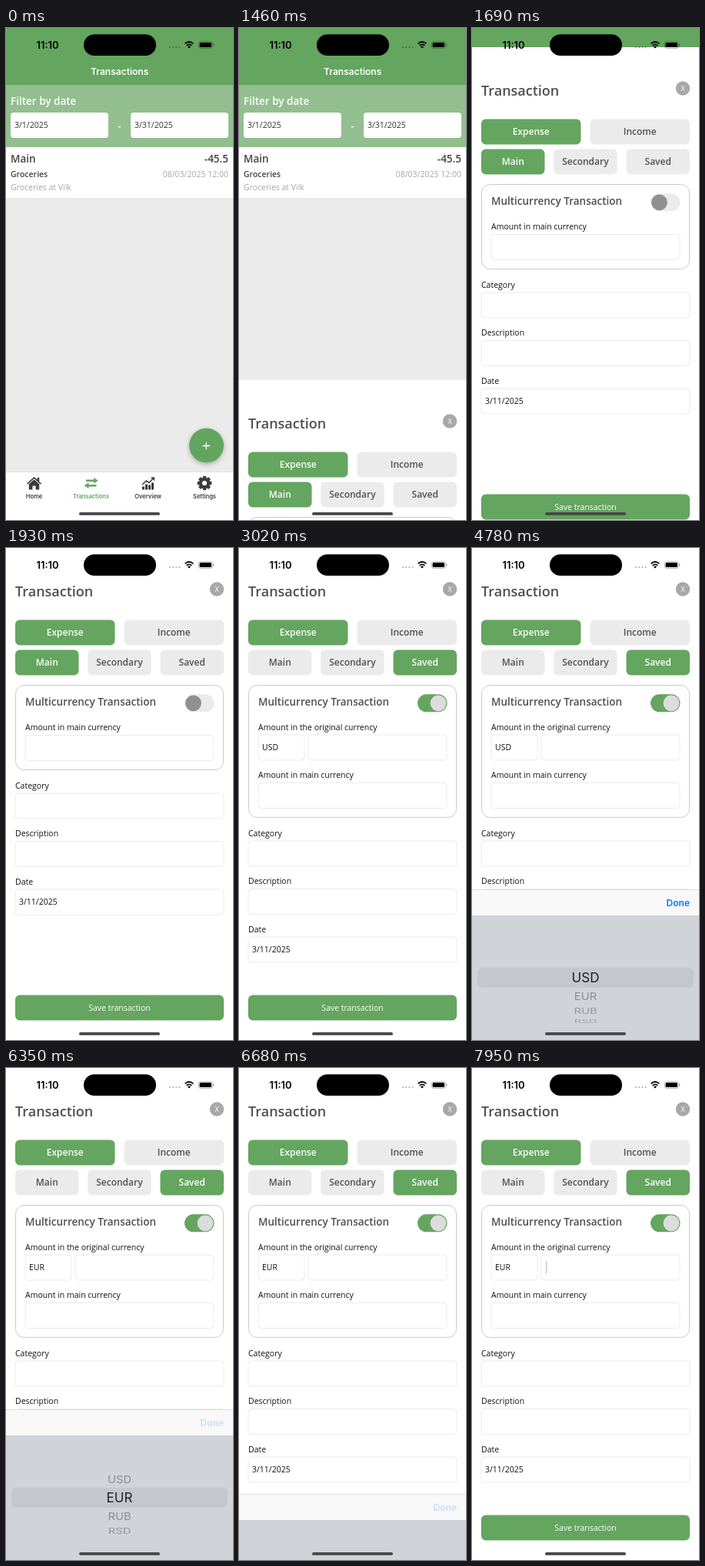
An HTML page that plays this animation: 295 px wide and 640 px high, repeating every 8000 ms.

```html
<!DOCTYPE html>
<html lang="en">
<head>
<meta charset="utf-8">
<title>Transactions</title>
<style>
  html, body { margin: 0; width: 100%; height: 100%; overflow: hidden; background: #fff; }
  svg { display: block; width: 100vw; height: 100vh; }
  text { font-family: "Open Sans", "Noto Sans", sans-serif; white-space: pre; }
  .ui { font-family: Inter, "Liberation Sans", sans-serif; }
</style>
</head>
<body>
<svg id="stage" viewBox="0 0 295 640" xmlns="http://www.w3.org/2000/svg"></svg>
<script>
const LOOP = 8000;
const GREEN = '#64a55f', GREY = '#ebebeb', INK = '#505050';

// Steps: [time in ms, value], each held until the next one.
const sheetSteps = [[0, 640], [1460, 458], [1580, 115], [1690, 25], [1810, 4], [1930, 0]];
const knobSteps = [[0, 0], [2660, 0.1], [2780, 0.5], [2900, 0.9], [3020, 1]];
const pickerSteps = [[0, 200], [4330, 140], [4440, 42], [4550, 10], [4670, 2], [4780, 0],
  [6570, 12], [6680, 110], [6800, 185], [6910, 200]];
const wheelSteps = [[0, 0], [5280, 0.08], [5390, 0.22], [5650, 0.62], [5760, 0.93], [5870, 1]];
const caretSteps = [[0, 0], [7280, 1], [7950, 0.4]];
const plusSteps = [[0, 1], [980, 0.7]];

const at = (steps, t) => steps.reduce((v, s) => t >= s[0] ? s[1] : v, steps[0][1]);

// Markup helpers
const rect = (x, y, w, h, fill, r = 0, more = '') =>
  `<rect x="${x}" y="${y}" width="${w}" height="${h}" rx="${r}" fill="${fill}" ${more}/>`;
const circle = (x, y, r, fill, more = '') =>
  `<circle cx="${x}" cy="${y}" r="${r}" fill="${fill}" ${more}/>`;
const path = (d, fill, more = '') => `<path d="${d}" fill="${fill}" ${more}/>`;
const line = (d, color, w, more = '') =>
  path(d, 'none', `stroke="${color}" stroke-width="${w}" ${more}`);
// y is the middle of the capitals
const text = (x, y, size, str, fill = '#111', weight = 400, anchor = 'start', more = '') =>
  `<text x="${x}" y="${y + size * 0.36}" font-size="${size}" fill="${fill}" font-weight="${weight}" text-anchor="${anchor}" ${more}>${str}</text>`;
const ui = (x, y, size, str, fill, weight, anchor, more = '') =>
  text(x, y, size, str, fill, weight, anchor, `class="ui" ${more}`);
const group = (id, body, more = '') => `<g id="${id}" ${more}>${body}</g>`;

const button = (x, y, w, label, on, id) =>
  rect(x, y, w, 33, on ? GREEN : GREY, 6, id ? `id="${id}"` : '') +
  text(x + w / 2, y + 16.5, 12, label, on ? '#fff' : INK, 600, 'middle', id ? `id="${id}Text"` : '');
const input = (x, y, w) =>
  rect(x, y, w, 33, '#fff', 4, 'stroke="#e6e6e6" stroke-width=".8"');
const field = (y, label, x = 12, w = 271) =>
  text(x, y, 10.5, label) + input(x, y + 10, w);

function gear(cx, cy) {
  let teeth = '';
  for (let a = 0; a < 360; a += 45)
    teeth += rect(cx - 2.2, cy - 9.3, 4.4, 5, '#3c3c3c', 0.8, `transform="rotate(${a} ${cx} ${cy})"`);
  return teeth + circle(cx, cy, 5.2, 'none', 'stroke="#3c3c3c" stroke-width="4.2"');
}

function tabBar() {
  const labels = [[36.5, 'Home'], [110.5, 'Transactions'], [184.5, 'Overview'], [258, 'Settings']];
  const dark = '#3c3c3c';
  const bars = [[177, 4], [181, 7], [185, 6], [189, 9]]
    .map(([x, h]) => rect(x, 600.5 - h, 3, h, dark)).join('');
  return rect(0, 577, 295, 63, '#fff') + rect(0, 577, 295, 0.7, '#d6d6d6') +
    path('M27 592.6L36.5 583.8L40.6 587.6V584.8H43.2V590L46 592.6L45 593.7L36.5 586L28 593.7Z', dark) +
    path('M29.8 593.3L36.5 587.3L43.2 593.3V600.5H38.6V595.5H34.4V600.5H29.8Z', dark) +
    path('M104 587.4H114.2V585L119.8 588.7L114.2 592.4V590H104Z', GREEN) +
    path('M117.4 593.9H107.4V591.5L101.6 595.2L107.4 598.9V596.5H117.4Z', GREEN) +
    bars + line('M177 594L182.2 589L186 591.5L191 586', dark, 1.5) +
    path('M188 584.2H193V589.2Z', dark) + gear(258, 592) +
    labels.map(([x, s], i) => ui(x, 608.8, 7.5, s, i === 1 ? GREEN : dark, 600, 'middle')).join('');
}

function listPage() {
  return rect(0, 0, 295, 640, GREY) + rect(0, 0, 295, 74, GREEN) +
    ui(147.7, 57, 12, 'Transactions', '#fff', 600, 'middle') +
    rect(0, 74, 295, 81, '#93be8f') +
    text(6, 95, 13.5, 'Filter by date', '#fff', 600) +
    rect(6, 110, 127, 33, '#fff', 4) + rect(162, 110, 127, 33, '#fff', 4) +
    text(11, 126.5, 10.5, '3/1/2025', '#333') + text(167, 126.5, 10.5, '3/31/2025', '#333') +
    text(147.5, 127, 13.5, '-', '#fff', 600, 'middle') +
    rect(0, 155, 295, 66, '#fff') +
    text(6, 170.5, 13.5, 'Main', '#444', 600) + text(289, 170.5, 13.5, '-45.5', '#444', 600, 'end') +
    text(6, 190, 10.5, 'Groceries', '#444', 600) +
    text(289, 190, 10.5, '08/03/2025 12:00', '#a6a6a6', 400, 'end') +
    text(6, 207.5, 10.5, 'Groceries at Vilk', '#a6a6a6') +
    circle(260.5, 543, 22.5, GREEN, 'filter="url(#shade)"') +
    line('M255.5 543.5H265M260.25 538.8V548.2', '#fff', 1.3, 'id="plus"') + tabBar();
}

function sheet() {
  const original = text(25, 233, 10.5, 'Amount in the original currency') +
    input(25, 243, 60) + input(90, 243, 180) +
    text(30, 259.5, 10.5, 'USD', '#111', 400, 'start', 'id="currency"') +
    rect(95.8, 251, 1.6, 17, '#5a7cf0', 0.8, 'id="caret"');
  return rect(0, 0, 295, 640, '#fff') +
    text(12, 57, 18, 'Transaction', INK, 600) +
    circle(274, 53.5, 9.2, '#a8a8a8') + text(274, 53.5, 9, 'X', '#fff', 400, 'middle') +
    button(12, 93.5, 129.5, 'Expense', true) + button(153.5, 93.5, 129.5, 'Income', false) +
    button(12, 132.5, 82.5, 'Main', true, 'main') +
    button(106.2, 132.5, 82.5, 'Secondary', false) +
    button(200.5, 132.5, 82.5, 'Saved', false, 'saved') +
    rect(12.5, 178.5, 270, 172, '#fff', 11, 'id="card" stroke="#cbcbcb"') +
    text(25, 200, 13.5, 'Multicurrency Transaction', INK, 600) +
    rect(232, 190.3, 38.5, 23, GREY, 11.5, 'id="track"') +
    circle(243.5, 201.8, 10.4, '#909090', 'id="knob"') +
    group('original', original) +
    group('fields', field(295.5, 'Amount in main currency', 25, 245) +
      field(371, 'Category') + field(433.5, 'Description') + field(496, 'Date') +
      text(17, 522.5, 10.5, '3/11/2025')) +
    rect(12, 581.5, 271, 33, GREEN, 6) +
    text(147.5, 598, 10.5, 'Save transaction', '#fff', 400, 'middle');
}

function picker() {
  return rect(0, 444, 295, 34, '#f8f8f8') + rect(0, 444, 295, 0.8, '#dcdcdc') +
    ui(283, 461.5, 12, 'Done', '#007aff', 600, 'end', 'id="done"') +
    rect(0, 478, 295, 162, '#d0d4d8') +
    rect(7, 546, 281, 26, '#c4c8cc', 6) +
    group('far', '', 'clip-path="url(#outside)"') + group('near', '', 'clip-path="url(#inside)"');
}

function statusBar() {
  return rect(101, 8.3, 94, 27.7, '#000', 13.85) +
    ui(54, 22.2, 13, '11:10', '#000', 600, 'middle') +
    [213, 217.2, 221.4, 225.6].map(x => circle(x, 25, 1.1, '#000', 'opacity=".3"')).join('') +
    line('M232.6 20.4Q238 15.6 243.4 20.4M234.6 22.8Q238 19.8 241.4 22.8', '#000', 1.7) +
    path('M236 24.4Q238 22.8 240 24.4L238 26.6Z', '#000') +
    rect(250.3, 17.8, 18, 8.6, 'none', 2.7, 'stroke="#000" stroke-opacity=".4" stroke-width=".8"') +
    rect(251.6, 19.1, 15.4, 6, '#000', 1.6) + rect(269.2, 20.6, 1, 3, '#000', 0.5, 'opacity=".45"') +
    rect(95, 630, 105, 3.8, '#464646', 1.9);
}

const stage = document.getElementById('stage');
stage.innerHTML = `<defs>
  <filter id="shade" x="-40%" y="-40%" width="180%" height="180%">
    <feDropShadow dx="0" dy="2" stdDeviation="3" flood-opacity=".28"/>
  </filter>
  <clipPath id="inside"><path d="M0 546H295V572H0Z"/></clipPath>
  <clipPath id="outside"><path d="M0 478H295V546H0ZM0 572H295V640H0Z"/></clipPath>
</defs>` + listPage() + group('sheet', sheet()) + group('picker', picker()) + statusBar();

const el = {};
stage.querySelectorAll('[id]').forEach(n => el[n.id] = n);
const set = (id, attrs) => Object.entries(attrs).forEach(([k, v]) => el[id].setAttribute(k, v));
const shift = (id, y) => set(id, { transform: `translate(0 ${y})` });
const paint = (id, on) => {
  set(id, { fill: on ? GREEN : GREY });
  set(id + 'Text', { fill: on ? '#fff' : INK });
};

// Items sit on a drum, enlarged while inside the selection band.
function wheel(pos, size, near) {
  return ['USD', 'EUR', 'RUB', 'RSD'].map((name, i) => {
    const angle = (i - pos) * 0.39, squash = Math.cos(angle);
    const y = 559 + 62 * Math.sin(angle);
    const fade = near ? 1 : 0.25 + 0.3 * squash;
    return `<g transform="translate(147.5 ${y}) scale(1 ${squash})" opacity="${fade}">` +
      ui(0, 0, size, name, near ? '#1c1e20' : '#4c4f52', 400, 'middle') + '</g>';
  }).join('');
}

function draw(t) {
  const open = t >= 2660, knob = at(knobSteps, t), pos = at(wheelSteps, t);
  set('plus', { opacity: at(plusSteps, t) });
  shift('sheet', at(sheetSteps, t));
  paint('main', !open);
  paint('saved', open);
  set('card', { height: open ? 172 : 110 });
  set('original', { visibility: open ? 'visible' : 'hidden' });
  shift('fields', open ? 0 : -62);
  const mix = (a, b) => Math.round(a + (b - a) * knob);
  set('track', { fill: `rgb(${mix(235, 100)},${mix(235, 165)},${mix(235, 95)})` });
  const tone = mix(144, 220);
  set('knob', { cx: 243.5 + 15.5 * knob, fill: `rgb(${tone},${tone},${tone})` });
  el.currency.textContent = t >= 5870 ? 'EUR' : 'USD';
  set('caret', { opacity: at(caretSteps, t) });
  shift('picker', at(pickerSteps, t));
  set('done', { opacity: t >= 6350 ? 0.2 : 1 });
  el.far.innerHTML = wheel(pos, 14.8, false);
  el.near.innerHTML = wheel(pos, 17, true);
}

const start = performance.now();
function tick() {
  draw((performance.now() - start) % LOOP);
  requestAnimationFrame(tick);
}
tick();
</script>
</body>
</html>
```
